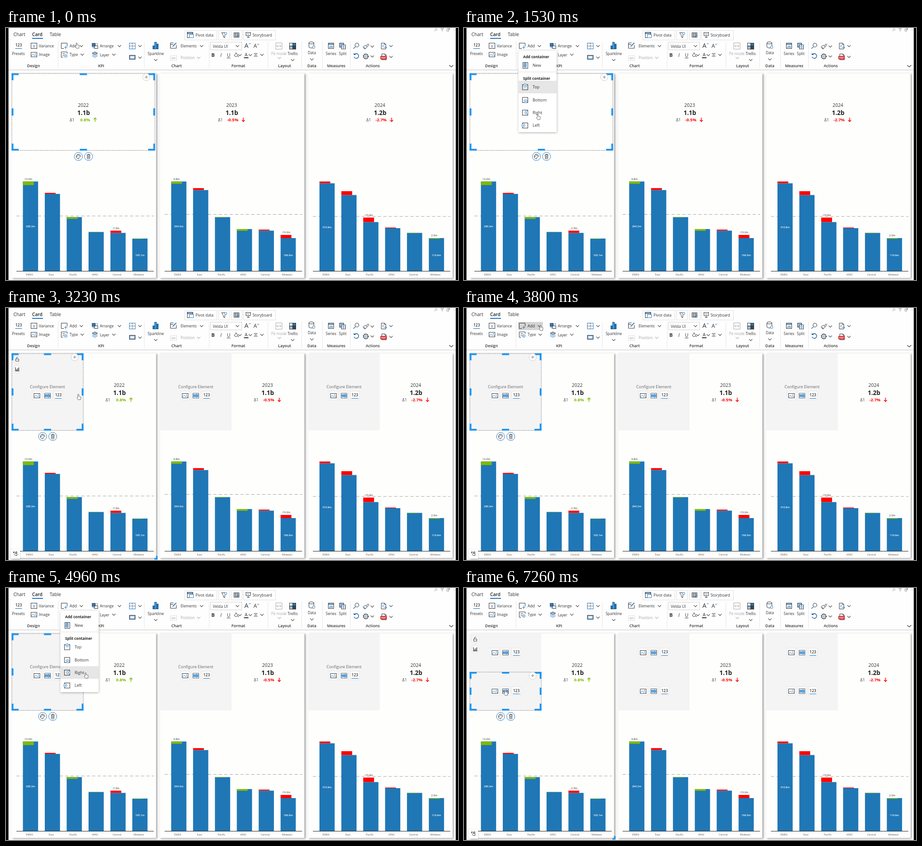
An HTML page with a canvas for the animation above (8000 ms loop, 1002 by 559 pixels).

```html
<!DOCTYPE html>
<html lang="en">
<head>
<meta charset="utf-8">
<title>Splitting card containers</title>
<style>
html, body { margin: 0; width: 100%; height: 100%; overflow: hidden; background: #fff; }
canvas { display: block; }
</style>
</head>
<body>
<canvas id="stage" width="1002" height="559"></canvas>
<script>
const ctx = document.getElementById('stage').getContext('2d');
const LOOP = 8000, PITCH = 328.7;
const INK = '#333', BLUE = '#2b7cc4', PALE = '#9cc4ea', SELECT = '#2196ee', BAR = '#1f77b6', GREEN = '#7fba00', RED = '#ff0000', DIM = '#a6a6a6';

// Drawing helpers; text is placed by the middle of its capitals.
function text(s, x, y, size = 8.3, color = INK, weight = 400, align = 'center') {
  ctx.font = `${weight} ${size}px "Open Sans", "Noto Sans", sans-serif`;
  ctx.textAlign = align;
  ctx.fillStyle = color;
  ctx.fillText(s, x, y + size * 0.357);
}
const left = (s, x, y, size, color, weight) => text(s, x, y, size, color, weight, 'left');

function rect(x, y, w, h, fill, stroke) {
  if (fill) { ctx.fillStyle = fill; ctx.fillRect(x, y, w, h); }
  if (stroke) { ctx.strokeStyle = stroke; ctx.lineWidth = 1; ctx.strokeRect(x, y, w, h); }
}

function path(d, x, y, stroke = INK, fill = null, width = 1) {
  const p = new Path2D(d);
  ctx.save();
  ctx.translate(x, y);
  if (fill) { ctx.fillStyle = fill; ctx.fill(p); }
  if (stroke) { ctx.strokeStyle = stroke; ctx.lineWidth = width; ctx.stroke(p); }
  ctx.restore();
}

function circle(x, y, r, fill, stroke, width = 1) {
  ctx.beginPath();
  ctx.arc(x, y, r, 0, 7);
  if (fill) { ctx.fillStyle = fill; ctx.fill(); }
  if (stroke) { ctx.strokeStyle = stroke; ctx.lineWidth = width; ctx.stroke(); }
}

function dashed(d, color, pattern, width = 1) {
  ctx.setLineDash(pattern);
  path(d, 0, 0, color, null, width);
  ctx.setLineDash([]);
}

function shadowed(color, blur, dx, dy, draw) {
  ctx.save();
  Object.assign(ctx, { shadowColor: color, shadowBlur: blur, shadowOffsetX: dx, shadowOffsetY: dy });
  draw();
  ctx.restore();
}

const chevron = (x, y, color = INK) => path('M-3.5-1.8L0 1.8L3.5-1.8', x, y, color, null, 1.1);
const plus = (x, y, r, color, width = 1) => path(`M${-r} 0H${r}M0 ${-r}V${r}`, x, y, color, null, width);

function picture(x, y) {
  rect(x - 6.5, y - 5, 13, 10, '#fff', INK);
  path('M-6 3L-2-1L1 2.5L3 .5L6 3.5', x, y, BLUE);
  circle(x + 3, y - 2, 1, BLUE);
}

function digits(x, y) {
  text('123', x, y - 1, 8.5, INK, 600);
  path('M-7.5 0H7.5', x, y + 6.5, BLUE, null, 1.2);
}

function gear(x, y) {
  ctx.setLineDash([2, 1.6]);
  circle(x, y, 5.6, null, INK, 1.6);
  ctx.setLineDash([]);
  circle(x, y, 4.4, null, INK);
  circle(x, y, 1.8, null, BLUE);
}

function doc(x, y) {
  path('M-5-6.5H2L5-3.5V6.5H-5ZM2-6.5V-3.5H5', x, y, INK, '#fff');
}

function ribbonTop() {
  left('Chart', 16.5, 14.5, 10.2);
  left('Card', 58, 14.5, 10.2, '#222', 600);
  left('Table', 97, 14.5, 10.2);
  rect(58, 22, 24, 2, '#1b74c5');
  for (const [x, w] of [[396.5, 71], [471.5, 24], [499.5, 24], [526.5, 71]]) rect(x, 5.5, w, 21, '#fff', '#dedede');
  left('Pivot data', 420, 16, 8.6);
  left('Storyboard', 546.5, 16, 8.4);
  rect(402, 9.5, 12, 12, '#fff', INK);
  rect(402, 9.5, 12, 3, PALE, INK);
  rect(406.5, 14.5, 9, 7, '#fff', BLUE);
  path('M-6-5.5H5L1 .5V5.5L-2 4V.5Z', 484, 16, INK, '#fff');
  circle(487, 12.5, 2.5, '#fff', BLUE);
  rect(505.5, 10.5, 11, 10, '#fff', INK);
  path('M-5.5-2H5.5M-5.5 2H5.5M-2-5V5M2-5V5', 511, 15.5);
  path('M0 5L6-1', 511, 16, BLUE, null, 2);
  path('M-6-5.5H6M-5-5.5V1.5H5V-5.5M0 1.5V5.5M-3 5.5H3', 537, 15.5);
  rect(534.5, 12, 5, 2.5, PALE);
  path('M-2-2L2 2M0-3L3 0M-1 1L-3 3', 953, 4, '#777', null, .8);
  path('M-3.5-2.5H3.5M-2 0H2M-1 2.5H1', 967, 4, '#777', null, .9);
  path('M-3-2H1V3H-3ZM0-3H3V0M0 1L3-3', 980.5, 4, '#777', null, .8);
  text('…', 994, 2, 8, '#777');
}

function ribbonLeft(hover) {
  digits(28, 39);
  text('Presets', 27.5, 57);
  rect(55.5, 33.5, 13, 12, '#fff', INK);
  text('±', 62, 39.5, 9, BLUE, 600);
  left('Variance', 73, 40.5);
  picture(62, 59);
  left('Image', 73, 59);

  if (hover) rect(120, 31, 55, 18, '#d4d4d4');
  path('M13 7V0H0V12H6', 122.5, 33.5);
  plus(132.5, 43, 3.5, BLUE);
  left('Add', 141, 40, 8.6);
  chevron(167, 40);
  path('M13 4V0H0V12H4M3 4H8M3 8H6', 122.5, 53);
  circle(132.5, 62, 3, '#fff', BLUE);
  circle(132.5, 62, 1, BLUE);
  left('Type', 141, 59.5);
  chevron(169, 59);

  rect(191, 34, 7, 7, BLUE, INK);
  rect(196.5, 39.5, 7, 6, '#fff', INK);
  path('M0-3H3V0M-7 2V6H-4', 200, 38, BLUE);
  left('Arrange', 208, 40.5);
  chevron(251.5, 40);
  path('M-6-3L0-6L6-3L0 0Z', 197, 59, INK, PALE);
  path('M-6 0L0 3L6 0M-6 3L0 6L6 3', 197, 59, BLUE);
  left('Layer', 208, 60);
  chevron(239, 59);
  rect(273.5, 33.5, 13, 13, '#fff', BLUE);
  dashed('M280 34V46M274 40H286', INK, [2, 1.5]);
  chevron(297, 40);
  rect(273.5, 60.5, 13, 9, '#cfe3f5', INK);
  path('M1.5 1.5H11.5V7.5H1.5Z', 273.5, 60.5, BLUE, '#fff');
  chevron(297, 65.5);
  rect(325.5, 39.5, 4, 7, BAR, '#185a8c');
  rect(329.5, 31.5, 4, 15, '#4e9cd8', '#185a8c');
  rect(333.5, 35.5, 4, 11, BAR, '#185a8c');
  text('Sparkline', 332, 57);
  chevron(332, 71);
}

function ribbonMiddle() {
  path('M13 5V12H0V0H7M0 3.5H6', 364.5, 33);
  path('M5 8L13 0', 364.5, 33, BLUE, null, 1.8);
  left('Elements', 387, 40.5);
  chevron(433.5, 40);
  dashed('M364.5 61.5H378.5V71.5H364.5Z', '#bbb', [2, 2]);
  text('KPI', 371.5, 66.5, 5.8, DIM, 600);
  left('Position', 387, 66.5, 8.4, DIM);
  chevron(427, 66, DIM);

  rect(453.5, 31.5, 69, 17, '#fff', '#d2d2d2');
  left('Velda UI', 458.5, 40.5, 8.7);
  chevron(513, 40);
  text('A', 533, 39, 14);
  path('M-2 1.5L0-1L2 1.5', 540.5, 34.5, BLUE);
  text('A', 552.5, 40, 12);
  path('M-2-1L0 1.5L2-1', 559, 36, BLUE);
  text('B', 459, 60.5, 11, INK, 700);
  text('I', 476.5, 60.5, 11, INK, 'italic 400');
  text('U', 493.5, 60, 10.5);
  path('M-4 0H4', 493.5, 66.5);
  path('M-4 1L0-4L4 0L0 4ZM0-4V-6', 510, 60);
  circle(514.5, 63, 1.3, BLUE);
  chevron(518.5, 60);
  text('A', 532.5, 59, 10);
  rect(527.5, 65, 10, 2, INK);
  chevron(541.5, 60);
  path('M-4-3H4M-2.5 0H2.5M-4 3H4', 553.5, 59.5);
  chevron(567.5, 59.5);

  path('M-7-7V7M7-7V7M-7-7H7M-7 7H7M-5 0H5M-3-2L-5 0L-3 2M3-2L5 0L3 2', 605, 40, DIM);
  text('Fit mode', 605, 57, 8.3, DIM);
  chevron(606, 66.5, DIM);
  for (let i = 0; i < 4; i++) rect(628.5 + i % 2 * 7, 33.5 + (i >> 1) * 7, 7, 6.5, ['#fff', BAR, PALE, '#444'][i], INK);
  text('Trellis', 635.5, 57);
  chevron(635.5, 71);
}

function ribbonRight() {
  path('M-6-5V4C-6 7 5 7 5 4V-5C5-8-6-8-6-5C-6-2 5-2 5-5', 677.5, 38);
  circle(682, 42.5, 2.8, '#fff', BLUE);
  text('Data', 678, 55.5);
  chevron(678, 69.5);
  rect(714.5, 33.5, 12, 12, '#fff', INK);
  rect(714.5, 33.5, 12, 3, PALE, INK);
  path('M-3 4V1M0 4V-1M3 4V0', 720.5, 40, BLUE, null, 1.6);
  text('Series', 720.5, 57);
  rect(739.5, 33.5, 9, 9, PALE, INK);
  rect(743.5, 37.5, 9, 9, '#fff', INK);
  path('M4.5 0V9M0 4.5H9', 743.5, 37.5, BLUE);
  text('Split', 746.5, 57);

  circle(778, 38, 4.2, null, INK, 1.1);
  path('M-3 3L-8 8', 778, 38, BLUE, null, 1.4);
  path('M-6 1L-1-3L3 1L-2 6ZM1-1L5-6L7-4L3 1', 797.5, 41, INK, '#fff');
  path('M-4 2L0 5', 797.5, 41, BLUE, null, 1.5);
  chevron(812, 41);
  path('M-4-3.5A5.3 5.3 0 1 1-5 2M-5-6V-3H-1.5', 776.5, 62, '#1f5f9c', null, 1.4);
  gear(797.5, 63);
  chevron(812, 63);
  doc(837, 40);
  path('M-3-2H1M-3 1H0M0 3H7M5 1L7 3L5 5', 837, 40, BLUE);
  chevron(853.5, 40);
  doc(838, 64);
  rect(830, 62, 14, 7.5, '#d2232a');
  text('PDF', 837, 65.8, 5.4, '#fff', 700);
  chevron(853.5, 64);
  path('M-4.5-2L0 2L4.5-2', 987, 84.5, INK, null, 1.2);
}

function ribbon(hover) {
  const groups = [[61, 'Design'], [211, 'KPI'], [378, 'Chart'], [515, 'Format'], [617.5, 'Layout'], [678, 'Data'], [732, 'Measures'], [813, 'Actions']];
  for (const [x, name] of groups) text(name, x, 83.5, 8.7, INK, 600);
  for (const x of [115, 306, 450, 580, 655, 701, 763]) rect(x, 30, 1, 60, '#e6e6e6');
  rect(5, 92, 992, 1, '#d8d8d8');
  rect(5, 93, 992, 2, '#f0f0f0');
  ribbonTop();
  ribbonLeft(hover);
  ribbonMiddle();
  ribbonRight();
}

// Bars: [top, variance]; a positive variance hangs inside the bar, a negative one stands on it.
const regions = ['EMEA', 'East', 'Pacific', 'APAC', 'Central', 'Midwest'];
const cards = [
  { year: '2022', total: '1.1b', change: '0.8%', mean: 417, inner: ['289.2m', 440, '105.1m'],
    bars: [[340.5, 8], [368, -2.3], [419.5, 4], [452.5, .6], [454.5, -5], [467, .7]], notes: { 0: '12.0m', 4: '-7.3m' } },
  { year: '2023', total: '1.1b', change: '-0.5%', mean: 413.5, inner: ['290.3m', 440, '106.9m'],
    bars: [[340.5, 5], [359.5, -4.3], [419.5, 1], [446, 4], [449.5, -2.3], [466, -7]], notes: { 0: '6.8m', 5: '-10.2m' } },
  { year: '2024', total: '1.2b', change: '-2.7%', mean: 418, inner: ['310.8m', 442, '116.6m'],
    bars: [[344.5, -4], [370.5, -8.5], [430.5, -10], [444, -1.4], [454.5, .8], [466, 1.6]], notes: { 2: '-15.0m', 5: '2.5m' } }
];

function chart(card) {
  dashed(`M23 ${card.mean}H327.5`, '#a0a0a0', [7, 5]);
  card.bars.forEach(([top, v], i) => {
    const x = 37.5 + i * 48.5, high = Math.min(top, top + v);
    rect(x, top, 33.7, 539 - top, BAR);
    rect(x, high, 24, Math.abs(v), v > 0 ? GREEN : RED);
    if (card.notes[i]) text(card.notes[i], x + 12, high - 6, 5.9, '#222');
    text(regions[i], x + 14.5, 547, 5.8, '#555');
  });
  text(card.inner[0], 54.3, card.inner[1], 5.8, '#fff', 600);
  text(card.inner[2], 296.8, 503.5, 5.8, '#fff', 600);
  rect(23, 539, 304.5, 1, '#222');
}

function kpi(card, x) {
  const up = card.change[0] !== '-', color = up ? GREEN : RED;
  text(card.year, x, 171, 10.4);
  text(card.total, x + .5, 188, 13.6, '#222', 700);
  text('Δ1', x - 25, 203.5, 9.2, '#444');
  text(card.change, x + (up ? 4 : 2.5), 203.5, 9.4, color, 700);
  path(up ? 'M0 4.5V-4M-3.3-.8L0-4.2L3.3-.8' : 'M0-4.5V4M-3.3 .8L0 4.2L3.3 .8', x + 26, 203.5, color, null, 1.5);
}

function buttons(y) {
  for (const x of [68.5, 92, 116]) rect(x - 9.5, y - 9.5, 19, 19, '#fff', '#e4e4e4');
  picture(68.5, y + .5);
  rect(85.5, y - 5, 13, 11, '#fff', '#555');
  rect(86, y - 2, 12, 5, '#5aa5e6');
  path('M-6-2H6M-6 3H6M2-4.5V-2M2 3V5.5', 92, y, BLUE, null, .8);
  digits(116, y);
}

function drawCard(card, i, split, rows) {
  ctx.save();
  ctx.translate(i * PITCH, 0);
  shadowed('rgba(0,0,0,.4)', 4, 2, 1, () => rect(12.5, 100.5, 320.3, 454, '#fefefd'));
  if (split) {
    rect(12.5, 100.5, 158.8, 171, '#f4f4f4');
    if (!rows) text('Configure Element', 92, 175, 9, '#666');
    (rows ? [143, 228.5] : [194]).forEach(buttons);
  }
  kpi(card, split ? 251 : 171.5);
  chart(card);
  ctx.restore();
}

function selection([l, t, r, b]) {
  const cx = (l + r) / 2, cy = (t + b) / 2;
  dashed(`M${l + .5} ${t + .5}H${r - .5}V${b - .5}H${l + .5}Z`, '#777', [2.5, 1.5], .9);
  for (const [x, y, sx, sy] of [[l, t, 1, 1], [r, t, -1, 1], [l, b, 1, -1], [r, b, -1, -1]]) {
    rect(x, y, 15.5 * sx, 4 * sy, SELECT);
    rect(x, y, 4 * sx, 15.5 * sy, SELECT);
  }
  for (const y of [t, b - 4]) rect(cx - 8, y, 16, 4, SELECT);
  for (const x of [l, r - 4]) rect(x, cy - 8, 4, 16, SELECT);

  circle(r - 19.5, t + 8.5, 8, '#fff', '#ccc');
  plus(r - 19.5, t + 8.5, 3.5, '#777');
  const y = b + 13;
  for (const dx of [-11, 11.5]) circle(cx + dx, y, 9, '#fff', BLUE);
  path('M1 5A5 5 0 1 1 5-1C5 2 0 0 1 5Z', cx - 11, y);
  for (const [dx, dy] of [[-3, 0], [-1, -3], [2, -2]]) circle(cx - 11 + dx, y + dy, .9, INK);
  path('M-4-3.5H4M-1.5-3.5V-5H1.5V-3.5M-3-3.5L-2.7 5H2.7L3-3.5M-1-1.5V3M1-1.5V3', cx + 11.5, y, INK, null, .9);
}

function cardTools() {
  for (const y of [113.5, 135.5]) circle(25, y, 8.5, '#fff', '#e0e0e0');
  path('M-3.5-.5H3.5V4.5H-3.5ZM-2-.5V-2.5A2 2 0 0 1 2-3', 25, 113.5);
  path('M-4-4V4H4.5M-1.5 3V0M1 3V-2M3.5 3V-4', 25, 135.5, INK, null, 1.3);
  rect(329, 554.5, 7, 3.5, SELECT);
  rect(332.5, 550, 3.5, 8, SELECT);
}

function touchButton() {
  shadowed('rgba(0,0,0,.25)', 3, 0, 1, () => rect(10, 535, 21, 21, '#fff'));
  path('M-4-4L1 1M-4-4V-1M-4-4H-1M0 4L-3 1M0 4H4V0L0-2', 20.5, 545);
  circle(23, 542, 1.6, null, INK);
}

const items = [['New', 83], ['Top', 131, 0, -4], ['Bottom', 159.5, 1, 3], ['Right', 187.5, 3, 0], ['Left', 216, -4, 0]];

function drawMenu(hoverY) {
  shadowed('rgba(0,0,0,.35)', 5, 0, 1, () => rect(120.5, 50, 85, 181, '#fff'));
  for (const [name, y, dx, dy] of items) {
    if (Math.abs(hoverY - y) < 14.2) rect(120.5, y - 14, 85, y > 200 ? 30 : 28, '#e6e6e6');
    left(name, 152, y, 9);
    if (dx === undefined) {
      rect(130.5, y - 6.5, 11, 13, '#fff', INK);
      path('M-2 4V-5H3V4ZM-5 1H-2M-1-2H2M-1 1H2', 135, y, BLUE, PALE);
      continue;
    }
    rect(129.5, y - 5.5, 12, 11.5, null, INK);
    circle(135.5 + dx, y + dy, 3.7, '#fff', BLUE, .9);
    plus(135.5 + dx, y + dy, 2, BLUE, .8);
  }
  left('Add container', 131, 64, 8.2, '#222', 700);
  left('Split container', 131, 112, 8.2, '#222', 700);
  rect(121, 97, 84.5, 1, '#ddd');
}

// Pointer route: time, x, y
const route = [
  [0, 158, 39], [160, 158, 39], [330, 168, 43], [1330, 168, 43], [1430, 168, 80], [1470, 167, 131],
  [1530, 165, 197], [1600, 165, 213], [1760, 167, 219], [2260, 167, 219], [2500, 162, 217], [3200, 162, 217],
  [3400, 160, 90], [3530, 158, 9], [3650, 166, 30], [3800, 171, 44], [4600, 171, 44], [4760, 176, 120],
  [4880, 178, 182], [4960, 178, 194], [5060, 178, 200], [5230, 171, 164], [6800, 171, 164],
  [7100, 93, 236], [7260, 93, 232], [LOOP, 93, 232]
];

function pointer(t) {
  const i = Math.max(1, route.findIndex(k => k[0] > t));
  const [t0, x0, y0] = route[i - 1], [t1, x1, y1] = route[i];
  const k = Math.max(0, (t - t0) / (t1 - t0));
  return [x0 + (x1 - x0) * k, y0 + (y1 - y0) * k];
}

function hand(x, y) {
  path('M-2.6 1V-5.2A1.1 1.1 0 0 1-.4-5.2V-1.6L3-.9Q4.3-.6 4.2 .8L3.6 4.4V6H-1.8L-4.3 2.4Q-4.6 .8-2.6 1.4Z', x, y, '#444', '#fff', .8);
}

const within = (t, a, b) => t >= a && t < b;

function draw(t) {
  const split = t >= 2660, rows = t >= 6060;
  const menu = within(t, 800, 2660) || within(t, 4230, 6060);
  const hoverY = pointer(t - 60)[1];  // hover feedback trails the pointer
  const inMenu = menu && hoverY > 50;

  rect(0, 0, 1002, 559, '#fefefe');
  ribbon(t > 230 && within(hoverY, 31, 50));
  cards.forEach((card, i) => drawCard(card, i, split, rows));
  selection([12.5, t < 6430 ? 100.5 : 186, t < 3000 ? 330.5 : 171.8, within(t, 6060, 6430) ? 186.5 : 272]);
  if (within(t, 2660, 3400) || rows) cardTools();
  if (t > 230 && !inMenu) touchButton();
  if (menu) drawMenu(hoverY);
  rect(0, 0, 5.5, 559, '#000');
  rect(997, 0, 5, 559, '#000');
  hand(...pointer(t));
}

function tick() {
  draw(performance.now() % LOOP);
  requestAnimationFrame(tick);
}
tick();
</script>
</body>
</html>
```
